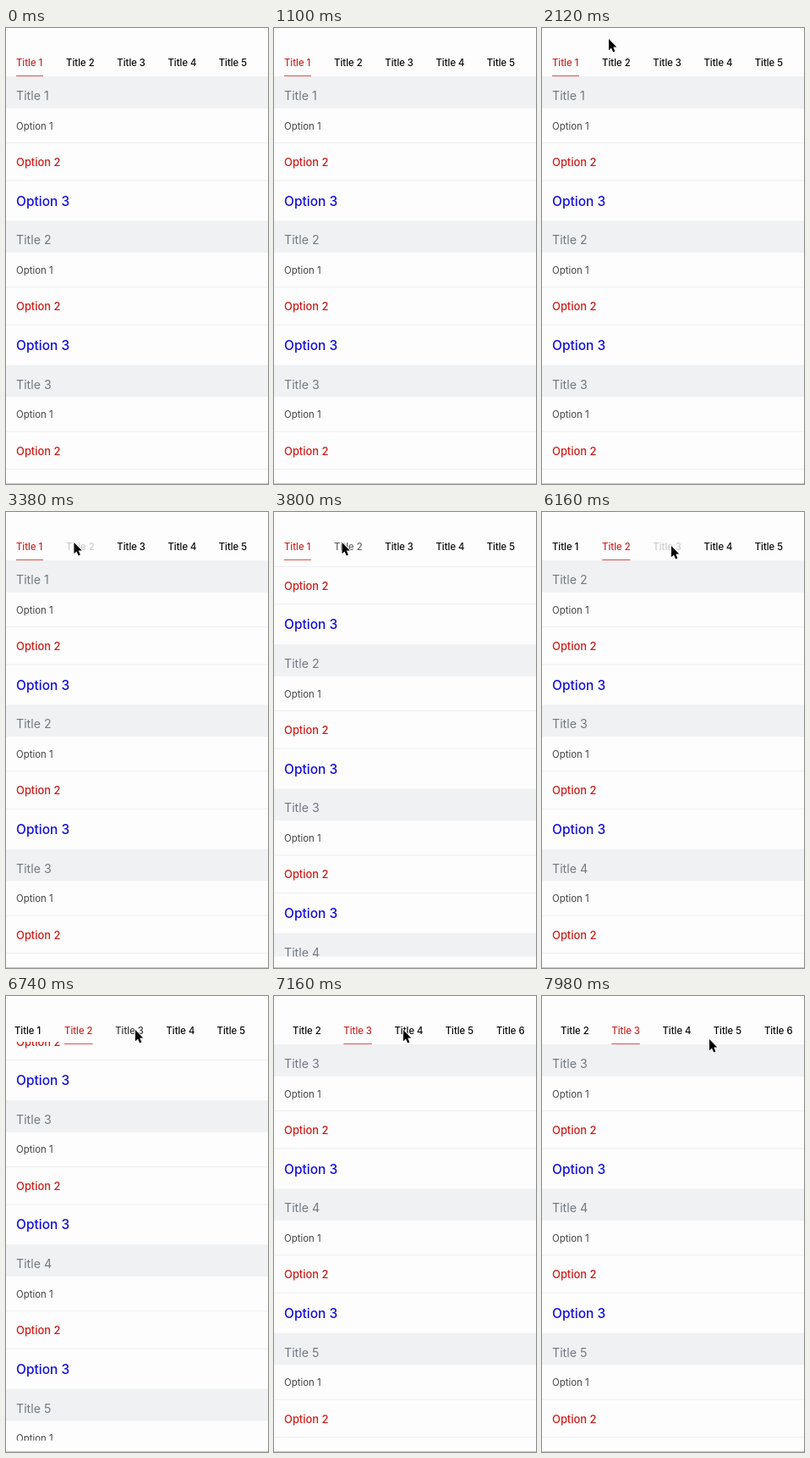
These frames come from a looping animation (310 px wide and 538 px high, 8 s). An HTML page with a canvas:

```html
<!DOCTYPE html>
<html lang="en">
<head>
<meta charset="utf-8">
<title>Tabs linked to a list</title>
<style>
  html, body { margin: 0; width: 100%; height: 100%; overflow: hidden; background: #fdfdfd; }
  canvas { display: block; width: 310px; height: 538px; }
</style>
</head>
<body>
<canvas id="stage"></canvas>
<script>
const W = 310, H = 538, LOOP = 8000;
const PAD = 12, LIST_TOP = 57, CLIP_TOP = 54, CLIP_BOTTOM = 524.5, SECTION = 170.3;
const BG = '#fdfdfd', BAND = '#eff1f3', RULE = '#f0f0f3';
const RED = '#cc2624', BLACK = '#080808';

const canvas = document.getElementById('stage');
const ctx = canvas.getContext('2d', { alpha: false });
const dpr = window.devicePixelRatio || 1;
canvas.width = W * dpr;
canvas.height = H * dpr;

// Rows of one section: text, size, weight, colour, baseline from the section top
const OPTIONS = [
  ['Option 1', 11.4, 400, '#444444', 62.5],
  ['Option 2', 12.9, 450, '#cc1f1a', 106],
  ['Option 3', 15.5, 450, '#1410dc', 152.5]
];
const RULES = [78, 122.5];

// Tab taps: the pressed tab and when its parts start
const TAPS = [
  { tab: 1, press: 3130, scroll: 3641 },
  { tab: 2, press: 6020, scroll: 6545 }
];
const FADE_DELAY = 30, SELECT_DELAY = 245;

// Pointer stops: time, x, y
const POINTER = [
  [1960, 78, 7], [2120, 79, 13], [2220, 79, 15], [2500, 80, 28], [2850, 80.5, 36],
  [4100, 80.5, 36], [4640, 140, 48], [4800, 146, 47], [5350, 153, 40],
  [7200, 153, 40], [7960, 198, 51], [8000, 198, 51]
];
const ARROW = [[0, 0], [0, 13.2], [3, 10.5], [5.2, 15.4], [7.4, 14.4], [5.3, 9.6], [9.3, 9.4]];

const clamp = v => Math.min(1, Math.max(0, v));
const mix = (a, b, k) => a + (b - a) * k;
const ease = v => v < 0.5 ? 2 * v * v : 1 - 2 * (1 - v) * (1 - v);
const tween = (t, start, length) => ease(clamp((t - start) / length));
const tabX = i => i ? 10.9 + 60.2 * i : PAD;

function rect(x, y, w, h, color) {
  ctx.fillStyle = color;
  ctx.fillRect(x, y, w, h);
}

function text(str, x, y, size, color, weight = 400) {
  ctx.font = `${weight} ${size}px Inter, Roboto, sans-serif`;
  ctx.fillStyle = color;
  ctx.fillText(str, x, y);
}

function drawList(scroll) {
  ctx.save();
  ctx.beginPath();
  ctx.rect(0, CLIP_TOP, W, CLIP_BOTTOM - CLIP_TOP);
  ctx.clip();
  for (let i = 0; i < 8; i++) {
    const top = LIST_TOP + i * SECTION - scroll;
    if (top > CLIP_BOTTOM || top + SECTION < CLIP_TOP) continue;
    rect(0, top, W, 37.6, BAND);
    text(`Title ${i + 1}`, PAD, top + 28, 14.2, '#747a80');
    for (const y of RULES) rect(0, top + y, W, 1, RULE);
    for (const [label, size, weight, color, y] of OPTIONS) {
      text(label, PAD, top + y, size, color, weight);
    }
  }
  ctx.restore();
}

function tabOpacity(t, i) {
  const tap = TAPS.find(p => p.tab === i);
  if (!tap) return 1;
  const pressed = tween(t, tap.press, 150) - tween(t, tap.scroll + FADE_DELAY, 250);
  return 1 - 0.8 * pressed;
}

function drawTabs(t) {
  const active = TAPS.filter(p => t >= p.scroll + SELECT_DELAY).length;
  const shift = 49 * tween(t, 6690, 350);
  for (let i = 0; i < 7; i++) {
    const x = tabX(i) - shift, on = i === active;
    ctx.globalAlpha = tabOpacity(t, i);
    text(`Title ${i + 1}`, x, 45.2, 11.3, on ? RED : BLACK, 500);
    if (on) rect(x, 56, i ? 33.5 : 32, 1, '#e4504c');
    ctx.globalAlpha = 1;
  }
}

function drawPointer(t) {
  if (t < POINTER[0][0]) return;
  const next = Math.max(1, POINTER.findIndex(p => p[0] > t));
  const [t0, x0, y0] = POINTER[next - 1], [t1, x1, y1] = POINTER[next];
  const k = (t - t0) / (t1 - t0);
  ctx.save();
  ctx.translate(mix(x0, x1, k), mix(y0, y1, k));
  ctx.beginPath();
  for (const [x, y] of ARROW) ctx.lineTo(x, y);
  ctx.closePath();
  ctx.lineWidth = 1.6;
  ctx.lineJoin = 'round';
  ctx.strokeStyle = '#fff';
  ctx.stroke();
  ctx.fillStyle = '#000';
  ctx.fill();
  ctx.restore();
}

function draw(t) {
  ctx.setTransform(dpr, 0, 0, dpr, 0, 0);
  rect(0, 0, W, H, BG);
  const scroll = TAPS.reduce((sum, p) => sum + SECTION * tween(t, p.scroll, 350), 0);
  drawList(scroll);
  drawTabs(t);
  rect(0, 537, W, 1, '#c8c8c8');
  drawPointer(t);
}

const begin = performance.now();
function frame() {
  draw((performance.now() - begin) % LOOP);
  requestAnimationFrame(frame);
}
frame();
</script>
</body>
</html>
```
